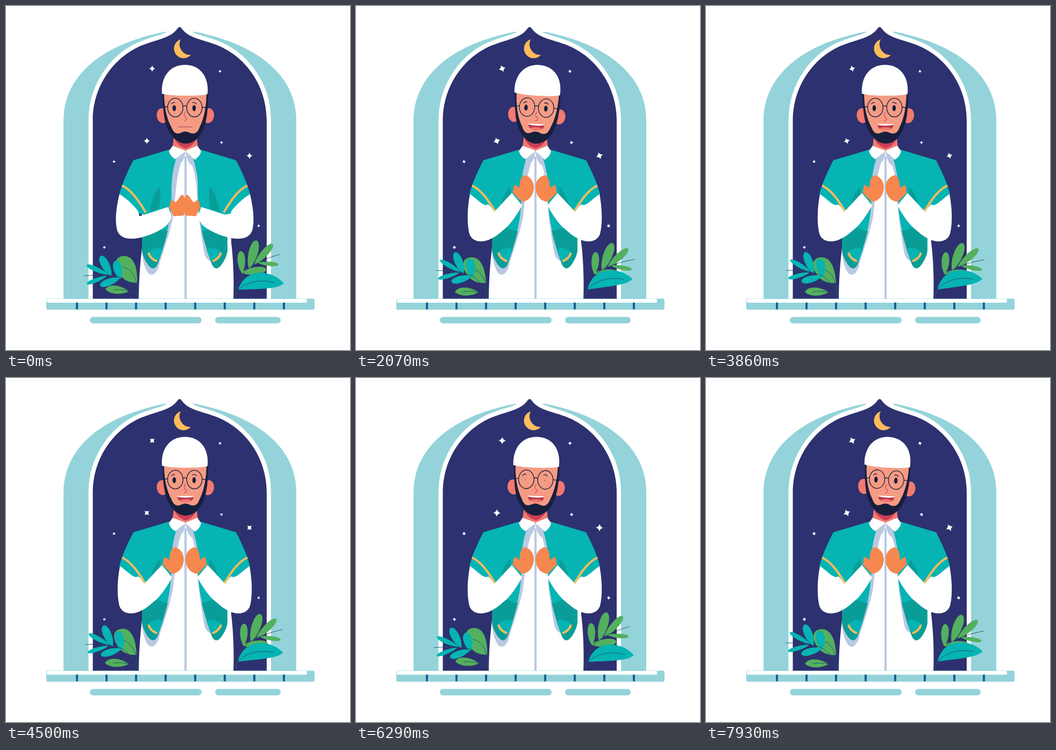
An HTML page that plays this animation: 640 by 640 pixels, repeating every 8 s.

```html
<!DOCTYPE html>
<html lang="en">
<head>
<meta charset="utf-8">
<title>Greeting at the window</title>
<style>
  html, body { margin: 0; width: 100%; height: 100%; overflow: hidden; background: #fff; }
  svg { display: block; width: 100vw; height: 100vh; }
  .light { fill: #94d3da; }
  .night { fill: #2d316f; }
  .teal { fill: #05b4b3; }
  .deep { fill: #0a9d98; }
  .green { fill: #53b05e; }
  .white { fill: #fff; }
  .shade { fill: #b9c9e1; }
  .skin { fill: #f59b83; }
  .blush { fill: #f27a6f; }
  .hand { fill: #f6874f; }
  .ink { fill: #171f3d; }
  .gold { fill: #ffbc5b; }
  .trim { fill: none; stroke: #ffbc5b; stroke-width: 4; }
  .line { fill: none; stroke: #171f3d; stroke-width: 1.3; stroke-linecap: round; }
  .vein { fill: none; stroke: #24506b; stroke-width: .9; stroke-linecap: round; }
</style>
</head>
<body>
<svg viewBox="0 0 640 640" xmlns="http://www.w3.org/2000/svg">
  <!-- window -->
  <path class="light" d="M107 546V213C107 138 166 74 295 48H352C481 74 540 138 540 213V546Z"/>
  <path class="night" stroke="#fff" stroke-width="16" paint-order="stroke"
    d="M161.500 555V213C161.500 147 203 91 259 71C283 62 307 59 319 42Q323 36 327 42C339 59 363 62 388 71C444 91 485 147 485 213V555Z"/>
  <path class="gold" d="M325 62A18 18 0 1 0 344 91A20 20 0 0 1 325 62Z"/>
  <g id="stars" class="white"></g>

  <!-- plants -->
  <g id="leftGreens">
    <path class="green" d="M244 515C224 515 212 505 206 488C202 476 205 466 219 465C238 465 245 486 244 515Z"/>
    <path class="green" d="M185 527C190 518 209 516 229 531C214 538 194 537 185 527Z"/>
    <path class="vein" d="M218 486C232 489 240 500 243 517L246 541M200 528C220 526 236 532 246 541"/>
  </g>
  <g id="leftFrond" class="teal">
    <path class="vein" d="M145 502C175 500 200 499 216 507C229 515 238 526 246 541"/>
  </g>
  <g id="rightFrond" class="green">
    <path class="vein" d="M509 462C482 470 455 482 441 498C433 509 429 524 425 541"/>
  </g>
  <g id="rightLeaf">
    <path class="teal" d="M432 528C438 507 455 496 474 496C495 497 508 506 517 516C506 527 470 526 432 528Z"/>
    <path class="vein" d="M500 515C475 508 448 512 432 528L425 541"/>
  </g>

  <!-- robe -->
  <path class="white" d="M253 385V450C249 485 247 515 247 548H423C424 520 424 480 419 440V380L352 264H314Z"/>
  <path class="shade" d="M314 278L326 291C317 315 316 350 311 390C304 430 290 460 284 486C278 501 270 503 264 496C257 486 253 470 253 450Z"/>
  <path class="shade" d="M344 284H352L358 350L378 440L385 474C378 476 370 470 368 455C364 430 357 390 355 345C354 325 350 305 344 290Z"/>
  <path class="shade" d="M313 283L334 271C332 285 328 293 320 293ZM353 284L334 271C336 285 341 297 350 298Z"/>
  <path class="shade" d="M332 280H336V546H332Z"/>

  <g id="leftSide">
    <path class="teal" d="M304 267L237 287C226 308 216 330 211 350C218 362 230 372 244 386L258 388L253 430V455C258 476 268 490 275 488C282 485 286 465 294 440C303 410 308 385 308 345C308 315 312 300 317 283Z"/>
    <path class="deep" d="M287 337C278 342 269 365 268 383L284 378C287 365 288 350 287 337Z"/>
    <path class="deep" d="M253 425C266 425 275 416 280 411C288 416 295 419 301 418C296 440 288 464 283 478C278 492 270 489 264 481C257 471 253 462 253 452Z"/>
    <path class="teal" d="M264 459C272 450 284 447 292 453C289 462 285 470 281 476C272 472 267 467 264 459Z"/>
    <path class="trim" d="M265 459C267 467 273 472 281 475M216 334C234 343 246 361 260 384"/>
    <path class="white sleeve"/>
    <path class="hand fist"/>
  </g>
  <g id="rightSide" transform="matrix(-1 0 0 1 665 0)"></g>

  <!-- neck and collar -->
  <path class="blush" d="M313 238L310 262L334 271L357 262L354 238Z"/>
  <path fill="#cb3e55" d="M313 246H355C349 258 342 263 334 265C325 262 318 257 313 246Z"/>
  <path class="white" d="M310 260L303 270Q306 280 315 285L334 269ZM356 260L363 270Q361 280 351 286L334 269Z"/>

  <!-- head -->
  <g id="head">
    <ellipse class="blush" cx="291" cy="204" rx="10.5" ry="14" transform="rotate(-8 291 204)"/>
    <ellipse class="blush" cx="376.5" cy="204" rx="10.5" ry="14" transform="rotate(8 376 204)"/>
    <path class="ink" d="M291 160C292 193 294 213 301 229C310 247 322 256 334 256C348 256 360 246 367 229C374 213 376 193 376 160Z"/>
    <path class="skin" d="M294 160C294 188 299 210 308 226C312 237 318 239 325 236Q334 231 342 236C350 239 356 237 360 226C368 210 373 188 373 160Z"/>
    <g class="ink">
      <ellipse class="eye" cx="313" cy="190"/>
      <ellipse class="eye" cx="350" cy="190"/>
    </g>
    <path class="line" d="M308 182Q311 178 314 180M347 180Q351 178 354 182"/>
    <g class="line">
      <ellipse cx="315" cy="189" rx="14.3" ry="17.3"/>
      <ellipse cx="350.5" cy="189" rx="14.3" ry="17.3"/>
      <path d="M329 187Q332.5 184 336 187M301 187L293 189M365 188L375 190"/>
    </g>
    <path fill="none" stroke="#d14a5c" stroke-width="1.2" d="M334 197C330 203 331 205 336 209Q336 213 331 214"/>
    <path id="lips" fill="none" stroke="#c2405a" stroke-width="1.1" d="M320 225H347"/>
    <g id="mouth">
      <path fill="#be3a50" d="M319 220H349C349 228 343 231 334 231C325 231 319 228 319 220Z"/>
      <path class="blush" d="M322 228Q334 223 346 228Q341 231 334 231Q327 231 322 228Z"/>
      <path class="white" d="M319 219.500H349V221Q334 224 319 221Z"/>
    </g>
    <path class="white" d="M290 163C288 130 306 109.500 333 109.500C360 109.500 378 130 375 164C360 168 305 168 290 163Z"/>
  </g>

  <!-- sill -->
  <rect class="light" x="75" y="544.500" width="499" height="20.500" rx="3"/>
  <rect class="white" x="76" y="545" width="484" height="7" rx="2"/>
  <path d="M130 558H520" stroke="#0f6296" stroke-width="12.500" stroke-dasharray="4 51"/>
  <rect class="light" x="156" y="578.500" width="208" height="12" rx="6"/>
  <rect class="light" x="389" y="578.500" width="122" height="12" rx="6"/>
</svg>
<script>
  const LOOP = 8000, CYCLE = 6000;
  const $ = id => document.getElementById(id);
  const all = selector => document.querySelectorAll(selector);
  const clamp = v => Math.min(1, Math.max(0, v));
  const ease = v => (1 - Math.cos(Math.PI * clamp(v))) / 2;
  const ramp = (t, from, to) => ease((t - from) / (to - from));

  function add(parent, d, first) {
    const path = document.createElementNS('http://www.w3.org/2000/svg', 'path');
    path.setAttribute('d', d);
    first ? parent.prepend(path) : parent.append(path);
    return path;
  }

  // Almond leaf from base (x, y) to tip (tx, ty).
  function leaf(parent, x, y, tx, ty, width) {
    const len = Math.hypot(tx - x, ty - y), w = width * .67;
    const path = add(parent, `M0 0C${len * .3} ${w} ${len * .98} ${w} ${len} 0C${len * .98} ${-w} ${len * .3} ${-w} 0 0Z`, true);
    const angle = Math.atan2(ty - y, tx - x) * 180 / Math.PI;
    path.setAttribute('transform', `translate(${x} ${y}) rotate(${angle})`);
  }

  [[190, 500, 150, 482, 9], [196, 503, 176, 465, 15], [213, 508, 204, 474, 16],
   [188, 502, 150, 517, 8], [212, 506, 175, 520, 13]].forEach(l => leaf($('leftFrond'), ...l));
  [[439, 497, 437, 456, 14], [452, 489, 466, 436, 17], [462, 481, 496, 443, 13],
   [468, 478, 507, 481, 8], [437, 496, 484, 490, 14]].forEach(l => leaf($('rightFrond'), ...l));

  const stars = [[272, 116.5, 6], [398, 121.5, 3.2], [262, 251, 6], [401, 254, 3.2],
    [201, 289.5, 3.2], [453, 278.5, 6], [470, 409, 3.2], [183, 449, 3.2]]
    .map(([x, y, r]) => ({ x, y, r, el: add($('stars'), 'M0-1Q.22-.22 1 0Q.22 .22 0 1Q-.22 .22-1 0Q-.22-.22 0-1Z') }));

  $('rightSide').innerHTML = $('leftSide').innerHTML;

  // Matching outlines for the joined and the parted hands.
  const poses = {
    sleeve: [
      'M211 350C205 375 202 400 207 418C213 434 232 435 250 431C266 427 284 420 298 409C302 405 306 398 308 392L302 374C285 379 266 386 248 391C247 385 246 381 243 378C236 370 225 358 211 350Z',
      'M212 350C207 375 206 405 211 424C216 438 231 441 247 435C262 429 272 418 280 412C292 400 301 385 309 371L290 348C280 358 268 372 257 383C253 376 250 372 246 369C238 375 226 359 212 350Z'],
    fist: [
      'M316 365C321 361 322 354 328 351C333 354 334 362 334 372C334 380 333 386 330 390L312 391L303 374C306 370 305 362 308 361C311 361 313 365 316 365Z',
      'M304 338C305 322 308 315 315 315C326 318 331 328 331 338C330 352 323 361 312 364L308 364L291 347C294 340 292 334 295 333C298 333 300 337 304 338Z']
  };
  function blend([a, b], k) {
    const ends = b.match(/\d+/g);
    let i = 0;
    return a.replace(/\d+/g, n => (+n + (ends[i++] - n) * k).toFixed(2));
  }

  const turn = (id, angle, x, y) => $(id).setAttribute('transform', `rotate(${angle} ${x} ${y})`);

  function draw(t) {
    const c = t % CYCLE;
    const sway = (1 - Math.cos(2 * Math.PI * c / CYCLE)) / 2;
    turn('leftFrond', 7.4 * sway, 246, 541);
    turn('leftGreens', -6 * sway, 246, 541);
    turn('rightFrond', 8 * sway, 425, 541);
    turn('rightLeaf', -6.6 * sway, 425, 541);

    const glow = 1 + .14 * Math.cos(2 * Math.PI * (t - 430) / 1500);
    for (const s of stars)
      s.el.setAttribute('transform', `translate(${s.x} ${s.y}) rotate(${90 * sway}) scale(${s.r * glow})`);

    turn('head', 3.1 * (ramp(c, 0, 540) - ramp(c, 3000, 3540)), 334, 250);

    const half = c % 3000;
    const blink = ramp(half, 130, 260) - ramp(half, 320, 450);
    for (const eye of all('.eye')) {
      eye.setAttribute('rx', 3.3 - 2.6 * blink);
      eye.setAttribute('ry', 5.5 - 4.8 * blink);
    }

    const smile = ramp(t, 100, 400);
    $('lips').style.display = smile < .1 ? '' : 'none';
    $('mouth').style.display = smile < .1 ? 'none' : '';
    $('mouth').setAttribute('transform', `translate(0 ${224 * (1 - smile)}) scale(1 ${smile})`);

    const lift = ramp(t, 0, 700);
    for (const name in poses) {
      const d = blend(poses[name], lift);
      all('.' + name).forEach(el => el.setAttribute('d', d));
    }
  }

  let start;
  function tick(now) {
    start ??= now;
    draw((now - start) % LOOP);
    requestAnimationFrame(tick);
  }
  draw(0);
  requestAnimationFrame(tick);
</script>
</body>
</html>
```
